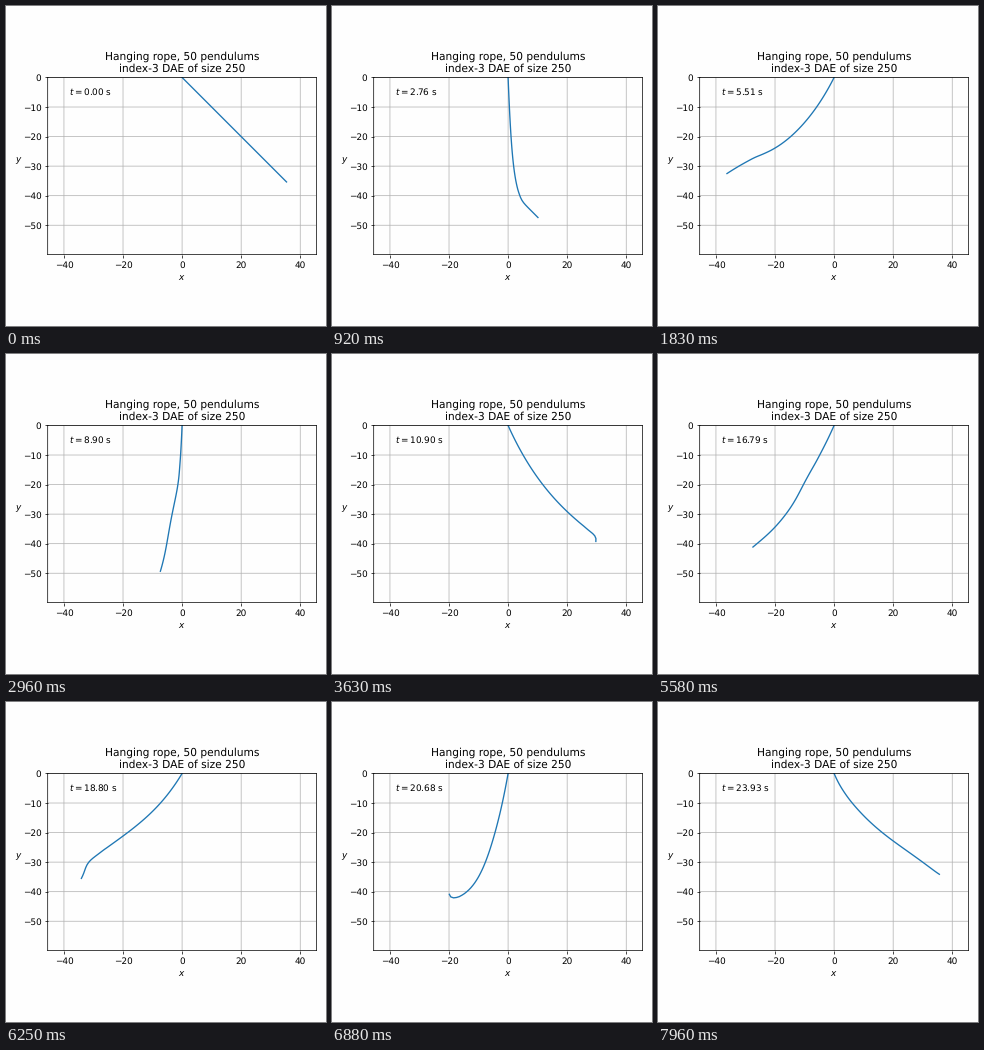
Recreate the animation shown at these times as a matplotlib script. Size 320 by 320 pixels, loop 8000 ms.

```python
import numpy as np
import matplotlib.pyplot as plt
from matplotlib.animation import FuncAnimation

N = 50             # unit masses on unit rods
G = 9.81
POSES = 192
LOOP_MS = 8000
TICK_MS = 20       # fine clock, so poses change on time
DT = 50 / 399      # simulated seconds per pose
SUBSTEPS = 24

idx = np.arange(N)
W = (N - np.maximum.outer(idx, idx)).astype(float)
weight = G * np.diag(W)


def accel(th, om):
    """Angular accelerations of the pendulum chain."""
    s, c = np.sin(th), np.cos(th)
    sq = om * om
    mass = W * (np.outer(c, c) + np.outer(s, s))
    rhs = c * (W @ (s * sq)) - s * (W @ (c * sq)) - weight * s
    return np.linalg.solve(mass, rhs)


def rk4(th, om, h):
    a1 = accel(th, om)
    om2 = om + h / 2 * a1
    a2 = accel(th + h / 2 * om, om2)
    om3 = om + h / 2 * a2
    a3 = accel(th + h / 2 * om2, om3)
    om4 = om + h * a3
    a4 = accel(th + h * om3, om4)
    return (th + h / 6 * (om + 2 * om2 + 2 * om3 + om4),
            om + h / 6 * (a1 + 2 * a2 + 2 * a3 + a4))


def simulate():
    th, om = np.full(N, np.pi / 4), np.zeros(N)
    poses = [th]
    for _ in range(POSES - 1):
        for _ in range(SUBSTEPS):
            th, om = rk4(th, om, DT / SUBSTEPS)
        poses.append(th)
    return np.array(poses)


def chain(steps):
    """Joint coordinates per pose, starting at the pivot."""
    return np.pad(np.cumsum(steps, axis=1), ((0, 0), (1, 0)))


angles = simulate()
xs, ys = chain(np.sin(angles)), chain(-np.cos(angles))

plt.rcParams.update({
    "font.family": "DejaVu Sans",
    "text.hinting": "none",
    "path.snap": False,
    "figure.facecolor": "#fefefe",
    "axes.facecolor": "#fefefe",
})
fig = plt.figure(figsize=(5, 5), dpi=64)
ax = fig.add_axes([0.1303, 0.223, 0.84, 0.5537])
ax.set(xlim=(-45.5, 45.5), ylim=(-59.95, 0),
       xticks=range(-40, 41, 20), yticks=range(-50, 1, 10))
ax.grid()
ax.set_xlabel("$x$")
ax.set_ylabel("$y$", rotation=0)
ax.set_title(f"Hanging rope, {N} pendulums\nindex-3 DAE of size {5 * N}")
rope, = ax.plot([], [])
clock = fig.text(0.198, 0.7215, "")


def update(tick):
    # A pose starts on the tick nearest to its due time.
    i = int((tick + 0.7) * TICK_MS * POSES / LOOP_MS)
    rope.set_data(xs[i], ys[i])
    clock.set_text(f"$t={i * DT:.2f}$ s")
    return rope, clock


anim = FuncAnimation(fig, update, frames=LOOP_MS // TICK_MS, interval=TICK_MS,
                     repeat=True, repeat_delay=0, cache_frame_data=False)
plt.show()
```
